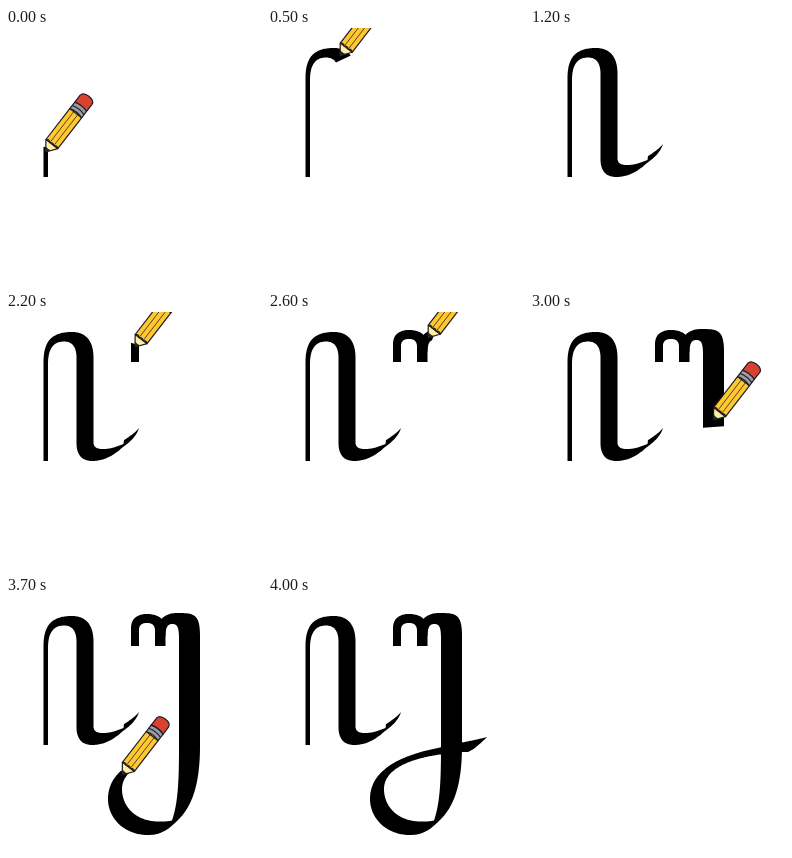
These frames come from a looping animation (256 by 256 pixels, 6 s). An HTML page with a canvas:

```html
<!DOCTYPE html>
<html lang="en">
<head>
<meta charset="utf-8">
<title>Pencil lettering</title>
<style>
  html, body { margin: 0; width: 100%; height: 100%; overflow: hidden; background: #fff; }
  canvas { display: block; width: 256px; height: 256px; }
</style>
</head>
<body>
<canvas id="stage" width="256" height="256"></canvas>
<script>
const ctx = document.getElementById('stage').getContext('2d');
const LOOP = 6000, STEP = 100;

// A ribbon is a chain of sections, each given by its outer and inner edge.
const hook = [
  ['M37.5 149V50', 'M42 149V52'],
  ['M37.5 50C37.5 28 47 20 66 20', 'M42 52C42 36 48 29.5 58 29.5'],
  ['M66 20C81 20 87.5 30 87.5 46', 'M58 29.5C67 29.5 70.5 36 70.5 46'],
  ['M87.5 46V131', 'M70.5 46V131'],
  ['M87.5 131C88 136 92 137 97 137', 'M70.5 131C70.5 143 76 149 86 149'],
  ['M97 137C106 137 112 134 117.5 132', 'M86 149C98 149 107 144 117 135'],
  ['M117.5 132L118 128Q128 122 133 116', 'M117 135Q130 126 133 116']
];
const hump = [
  ['M125 50V32', 'M133 50V34'],
  ['M125 32C125 22 132 18 141 18', 'M133 34C133 29 136 27 141 27'],
  ['M141 18C152 18 159.5 23 159.5 34', 'M141 27C146 27 149 29 149 35'],
  ['M159.5 34V50', 'M149 35V50']
];
const tail = [
  ['M152 34C152 22 160 17 172 17', 'M159.5 40C159.5 31 162 28 166 28'],
  ['M172 17C188 17 194 18 194 40', 'M166 28C172 28 173 32 173 44'],
  ['M194 40V150', 'M173 44V150'],
  ['M194 150C194 195 183 214 170 226', 'M173 150C173 185 172 207 166 224.5'],
  ['M170 226C160 236 152 239 142 239', 'M166 224.5C158 226 150 226 143 224.5'],
  ['M142 239C118 239 102 222 102 203', 'M143 224.5C126 221 116 208 116 193'],
  ['M102 203C102 176 128 160 172 151.5', 'M116 193C116 174 140 163 172 158.5'],
  ['M172 151.5C188 147 200 146 219 141', 'M172 158.5C184 156 192 156 200 156Q206 154 219 141']
];

// first: ink already down at the start; trail: how far the tip sits behind the ink.
const letters = [
  { start: 0, steps: 12, first: 30, ease: 1, trail: 5, ribbons: [hook] },
  { start: 2200, steps: 18, first: 18, ease: 1.28, trail: 8, ribbons: [hump, tail] }
];

function edge(d) {
  const path = document.createElementNS('http://www.w3.org/2000/svg', 'path');
  path.setAttribute('d', d);
  const length = path.getTotalLength();
  return { length, at: f => path.getPointAtLength(f * length) };
}

// Slices each ribbon into cross-sections about a pixel apart.
function slice(letter) {
  let base = 0;
  letter.cuts = letter.ribbons.map(sections => sections.flatMap(pair => {
    const [outer, inner] = pair.map(edge);
    const length = (outer.length + inner.length) / 2;
    const count = Math.ceil(length);
    const cuts = Array.from({ length: count + 1 }, (_, k) => ({
      outer: outer.at(k / count), inner: inner.at(k / count), dist: base + length * k / count
    }));
    base += length;
    return cuts;
  }));
  letter.length = base;
}
letters.forEach(slice);

function drawInk(letter, ink) {
  ctx.fillStyle = '#000';
  for (const ribbon of letter.cuts) {
    const cuts = ribbon.filter(c => c.dist <= ink + 0.01);
    ctx.beginPath();
    for (const c of cuts) ctx.lineTo(c.outer.x, c.outer.y);
    for (const c of cuts.reverse()) ctx.lineTo(c.inner.x, c.inner.y);
    ctx.fill();
  }
}

function tipAt(letter, ink) {
  const dist = ink - Math.min(letter.trail, ink * 0.18);
  const { outer, inner } = letter.cuts.flat().find(c => c.dist >= dist);
  return [(outer.x + inner.x) / 2, (outer.y + inner.y) / 2];
}

function shape(d, fill, line = 0) {
  const path = new Path2D(d);
  if (fill) { ctx.fillStyle = fill; ctx.fill(path); }
  if (line) { ctx.lineWidth = line; ctx.stroke(path); }
}

// The pencil lies along +x from its tip, then is turned up to the right.
function drawPencil(x, y) {
  const body = 'M10-7.5H49V7.5H10Q12.5 5 10 2.5Q12.5 0 10-2.5Q12.5-5 10-7.5Z';
  ctx.save();
  ctx.translate(x, y);
  ctx.rotate(Math.atan2(-0.79, 0.61));
  ctx.strokeStyle = '#1d1b26';
  ctx.lineJoin = 'round';
  shape('M0 0L10-7.5V7.5Z', '#fff0a0', 1.2);
  shape('M0 0L4.4-3.3Q3.4 0 4.4 3.3Z', '#25232f');
  shape(body, '#ffc82e');
  shape('M11-2.5H49M11 2.5H49', null, 0.7);
  shape(body, null, 1.2);
  shape('M57-7.5H66Q70.5-7 70.5 0Q70.5 7 66 7.5H57Q59.5 0 57-7.5Z', '#d8432f', 1.2);
  shape('M49-7.5H57Q59.5 0 57 7.5H49Q51.5 0 49-7.5Z', '#9b9ba3', 1.2);
  shape('M53-7.5Q55.5 0 53 7.5', null, 1.1);
  ctx.restore();
}

function draw(now) {
  const t = now % LOOP;
  ctx.fillStyle = '#fff';
  ctx.fillRect(0, 0, 256, 256);
  for (const letter of letters) {
    if (t < letter.start) continue;
    const n = Math.min(Math.floor((t - letter.start) / STEP), letter.steps);
    const part = (n / letter.steps) ** letter.ease;
    const ink = letter.first + (letter.length - letter.first) * part;
    drawInk(letter, ink);
    if (n < letter.steps) drawPencil(...tipAt(letter, ink));
  }
}

const begin = performance.now();
function tick() {
  draw(performance.now() - begin);
  requestAnimationFrame(tick);
}
tick();
</script>
</body>
</html>
```
